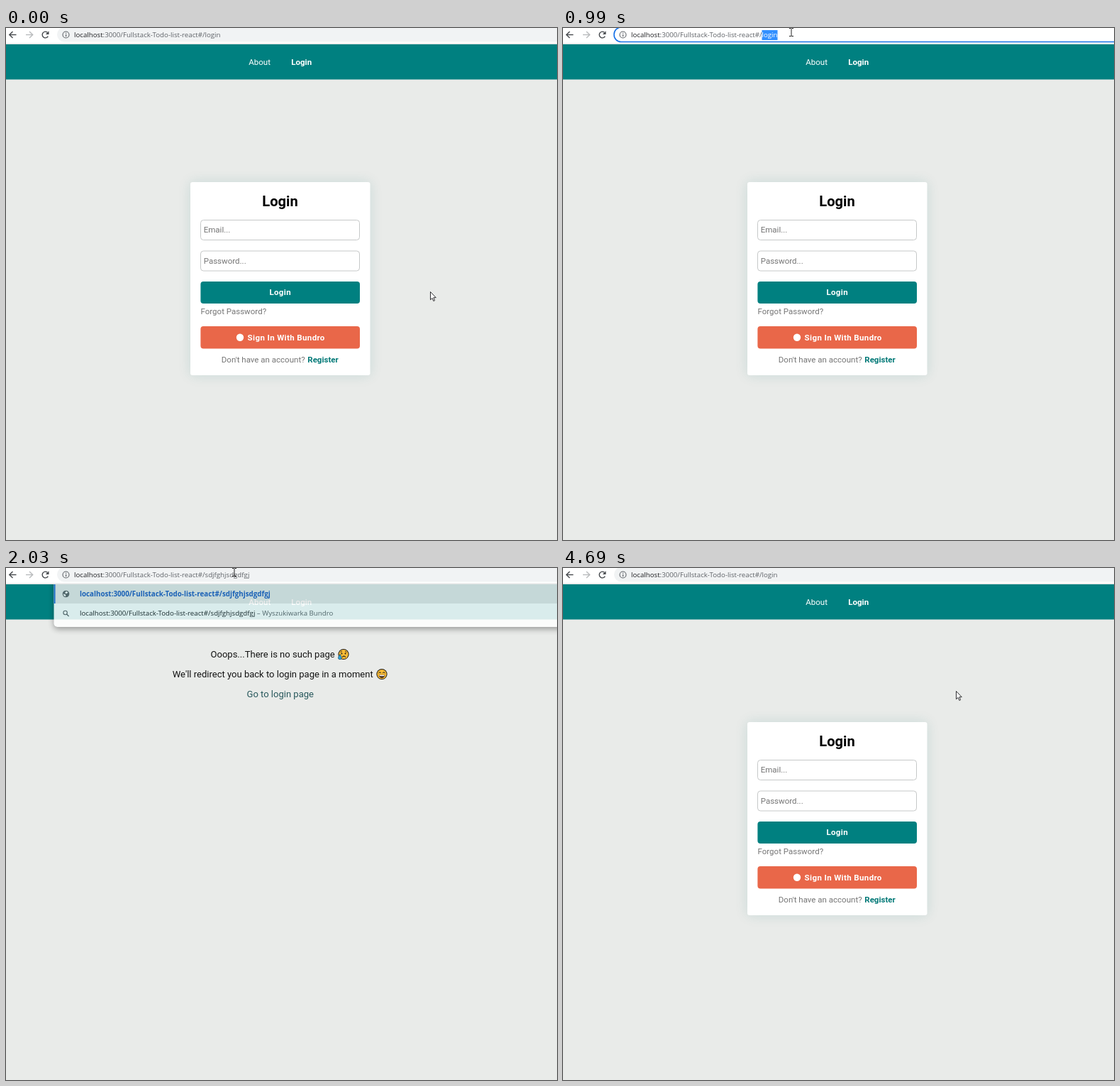
Animation, 777 px wide and 721 px high, one loop 5360 ms. Source, as an HTML page with a canvas:

```html
<!DOCTYPE html>
<html lang="en">
<head>
<meta charset="utf-8">
<title>Todo list login</title>
<style>
  html, body { margin: 0; width: 100%; height: 100%; overflow: hidden; background: #e9ebe9; }
  canvas { display: block; }
</style>
</head>
<body>
<canvas id="stage" width="777" height="721"></canvas>
<script>
const W = 777, H = 721, LOOP = 5360;
const stage = document.getElementById('stage').getContext('2d');
const layer = Object.assign(document.createElement('canvas'), { width: W, height: 110 }).getContext('2d');
let ctx = stage;

const TEAL = '#008080', INK = '#202124', GREY = '#5f6368', MUTED = '#757575';
const PAGE_FONT = 'Roboto, sans-serif', UI_FONT = '"Open Sans", sans-serif';
const UI_SIZE = 9.7, BODY = 11.52;
const HOST = 'localhost', BASE = ':3000/Fullstack-Todo-list-react#/', TYPED = 'sdjfghjsdgdfgj';

// y is the middle of the capitals; returns the x where the text ends
function text(str, x, y, { size = BODY, weight = 400, color = '#000', align = 'left', font = PAGE_FONT, spacing = 0 } = {}) {
  ctx.font = `${weight} ${size}px ${font}`;
  ctx.letterSpacing = spacing + 'px';
  ctx.textAlign = align;
  ctx.fillStyle = color;
  ctx.fillText(str, x, Math.round(y + size * 0.355));
  return x + ctx.measureText(str).width;
}

const uiText = (str, x, y, color, weight = 400, size = UI_SIZE) =>
  text(str, x, y, { size, font: UI_FONT, color, weight });

function rect(x, y, w, h, color) {
  ctx.fillStyle = color;
  ctx.fillRect(x, y, w, h);
}

function round(x, y, w, h, r, fill, stroke) {
  ctx.beginPath();
  ctx.roundRect(x, y, w, h, r);
  if (fill) { ctx.fillStyle = fill; ctx.fill(); }
  if (stroke) { ctx.strokeStyle = stroke; ctx.stroke(); }
}

function disc(x, y, r, color) {
  ctx.beginPath();
  ctx.arc(x, y, r, 0, Math.PI * 2);
  ctx.fillStyle = color;
  ctx.fill();
}

function line(points, color, width) {
  ctx.beginPath();
  points.forEach(([x, y]) => ctx.lineTo(x, y));
  ctx.strokeStyle = color;
  ctx.lineWidth = width;
  ctx.stroke();
}

function arc(x, y, r, from, to, color, width) {
  ctx.beginPath();
  ctx.arc(x, y, r, from, to);
  ctx.strokeStyle = color;
  ctx.lineWidth = width;
  ctx.stroke();
}

function withShadow(color, blur, dy, paint) {
  ctx.save();
  ctx.shadowColor = color;
  ctx.shadowBlur = blur;
  ctx.shadowOffsetY = dy;
  paint();
  ctx.restore();
}

// Paints on a separate layer, so that overlapping parts fade as one
function asLayer(alpha, paint) {
  ctx = layer;
  ctx.clearRect(0, 0, W, H);
  paint();
  ctx = stage;
  ctx.save();
  ctx.globalAlpha = alpha;
  ctx.beginPath();
  ctx.rect(0, 23, W, 90);
  ctx.clip();
  ctx.drawImage(layer.canvas, 0, 0);
  ctx.restore();
}

function navArrow(x, dir, color) {
  line([[x - 5 * dir, 9.5], [x + 4.5 * dir, 9.5]], color, 1.4);
  line([[x, 5], [x + 4.7 * dir, 9.5], [x, 14]], color, 1.4);
}

function reloadIcon() {
  arc(55.5, 9.5, 4.3, 0.5, 5.4, '#46494d', 1.4);
  ctx.beginPath();
  ctx.moveTo(60.5, 4.3);
  ctx.lineTo(60.5, 9);
  ctx.lineTo(55.8, 9);
  ctx.fillStyle = '#46494d';
  ctx.fill();
}

function infoIcon() {
  arc(84.5, 9.5, 4.5, 0, 7, GREY, 1.1);
  rect(84, 9, 1.2, 3.2, GREY);
  rect(84, 6.8, 1.2, 1.2, GREY);
}

function globeIcon(y) {
  disc(84.5, y, 4.8, GREY);
  ctx.fillStyle = '#fff';
  ctx.beginPath();
  ctx.moveTo(85, y - 3.8);
  ctx.lineTo(87.6, y - 2);
  ctx.lineTo(85, y - 0.2);
  ctx.lineTo(83, y - 1.6);
  ctx.fill();
  ctx.beginPath();
  ctx.moveTo(80.8, y - 0.2);
  ctx.lineTo(84.4, y + 1.2);
  ctx.lineTo(83.8, y + 3.8);
  ctx.lineTo(81.6, y + 2.4);
  ctx.fill();
}

function searchIcon(y) {
  arc(83.6, y - 1, 2.7, 0, 7, GREY, 1.1);
  line([[85.5, y + 1], [88.6, y + 4]], GREY, 1.3);
}

function urlText(x, tail) {
  const end = uiText(HOST, x, 9.5, INK);
  return uiText(BASE + tail, end, 9.5, GREY);
}

function toolbar() {
  rect(0, 0, W, 23, '#fff');
  rect(0, 21.5, W, 1.5, '#e3e5e5');
  navArrow(9.5, -1, '#46494d');
  navArrow(33, 1, '#b9bbbd');
  reloadIcon();
}

function addressBar(tail, selection) {
  const focused = selection !== 'none';
  ctx.lineWidth = 1.6;
  round(72, -1, 760, 20.5, 10, focused ? '#fff' : '#f1f3f4', focused ? '#1a73e8' : null);
  infoIcon();
  const end = urlText(96, tail);
  if (!focused) return;
  const from = selection === 'all' ? 96 : end - ctx.measureText(tail).width;
  rect(from, 3, end - from, 14, '#3390ff');
  const str = selection === 'all' ? HOST + BASE + tail : tail;
  uiText(str, from, 9.5, '#fff');
}

function suggestions(tail) {
  const url = HOST + BASE + tail;
  withShadow('rgba(0,0,0,.42)', 8, 3, () => round(67.5, -20, 760, 103, 5, '#fff'));
  rect(67.5, 23, W, 27, '#e8e8e8');
  rect(67.5, 23, 2, 27, '#1a66d0');
  globeIcon(36.5);
  uiText(url, 104, 36.5, '#1f5cc0', 700, 9.8);
  searchIcon(64);
  const end = uiText(url, 104, 64, INK);
  uiText(' – Wyszukiwarka Bundro', end, 64, GREY);
}

function typingBar(tail) {
  withShadow('rgba(0,0,0,.35)', 5, 0, () => rect(67.5, -20, W, 43, '#fff'));
  globeIcon(9.5);
  rect(Math.floor(urlText(104, tail)), 2.5, 1, 13, '#444');
}

function navBar(onLogin) {
  rect(0, 23, W, 49.5, TEAL);
  text('About', 342.3, 47.5, { color: '#fff', weight: onLogin ? 400 : 500 });
  text('Login', 416.7, 47.5, { color: '#fff', weight: onLogin ? 700 : 500, align: 'center' });
}

function field(y, label) {
  ctx.lineWidth = 1;
  round(274.5, y + 0.5, 224, 28, 4, '#fff', '#c6c8c8');
  text(label, 278.7, y + 14.3, { color: MUTED });
}

function loginCard() {
  const bold = { weight: 700, color: '#fff', spacing: 0.36 };
  withShadow('rgba(0,110,110,.14)', 18, 0, () => round(260, 217, 253.5, 272, 3, '#fff'));
  text('Login', 386.5, 243.5, { size: 20.16, weight: 700, align: 'center' });
  field(270, 'Email...');
  field(313.5, 'Password...');
  round(274.4, 357, 224.6, 31, 4, TEAL);
  text('Login', 386.7, 371.7, { ...bold, align: 'center' });
  text('Forgot Password?', 274.5, 398.5, { color: MUTED });
  round(274.4, 420, 224.6, 31.5, 4, '#e96749');
  disc(330, 435.7, 5.2, '#fff');
  text('Sign In With Bundro', 340.6, 435.5, bold);
  text("Don't have an account?", 303.8, 466.5, { color: MUTED });
  text('Register', 425.3, 466.5, { color: '#057a78', weight: 700 });
}

function face(x, y) {
  disc(x, y, 7.6, '#1c1a16');
  disc(x, y, 6.6, '#fcbd35');
}

function sadFace(x, y) {
  face(x, y);
  disc(x - 2.6, y - 1, 1.1, '#222');
  disc(x + 2.6, y - 1, 1.1, '#222');
  arc(x + 0.6, y + 5, 2.3, Math.PI * 1.1, Math.PI * 1.9, '#222', 1.1);
  line([[x - 4.5, y - 3], [x - 2, y - 4]], '#222', 0.9);
  line([[x + 4.5, y - 3], [x + 2, y - 4]], '#222', 0.9);
  ctx.beginPath();
  ctx.moveTo(x - 5, y);
  ctx.quadraticCurveTo(x - 10, y + 7, x - 5, y + 7.2);
  ctx.quadraticCurveTo(x - 0.6, y + 7, x - 5, y);
  ctx.fillStyle = '#2ea8e0';
  ctx.fill();
  ctx.strokeStyle = '#173f55';
  ctx.lineWidth = 0.7;
  ctx.stroke();
}

function happyFace(x, y) {
  face(x, y);
  arc(x - 2.8, y - 1.2, 1.5, Math.PI, Math.PI * 2, '#222', 1);
  arc(x + 2.8, y - 1.2, 1.5, Math.PI, Math.PI * 2, '#222', 1);
  ctx.beginPath();
  ctx.arc(x, y + 1, 4.4, 0, Math.PI);
  ctx.closePath();
  ctx.fillStyle = '#3b2418';
  ctx.fill();
  rect(x - 3.6, y + 1.2, 7.2, 1.5, '#fff');
}

function missingPage() {
  const opts = { size: 13.04, color: '#141414' };
  text('Ooops...There is no such page', 288.5, 121.3, opts);
  sadFace(476, 121.5);
  text("We'll redirect you back to login page in a moment", 234.7, 149.3, opts);
  happyFace(530, 149.5);
  text('Go to login page', 339.5, 177.3, { ...opts, color: '#28585c' });
}

function arrowPointer(x, y) {
  const shape = [[0, 0], [0, 11.2], [2.6, 8.9], [4.4, 13], [6.1, 12.2], [4.4, 8.2], [7.8, 8.2]];
  ctx.beginPath();
  shape.forEach(([dx, dy]) => ctx.lineTo(x + 0.5 + dx, y + 0.5 + dy));
  ctx.closePath();
  ctx.fillStyle = '#fff';
  ctx.fill();
  ctx.strokeStyle = '#1b1b1f';
  ctx.lineWidth = 0.9;
  ctx.stroke();
}

function beamPointer(x, y) {
  x = Math.round(x);
  y = Math.round(y);
  rect(x - 0.5, y - 5, 1, 11, '#222');
  for (const end of [y - 6, y + 5]) {
    rect(x - 3, end, 2.5, 1, '#222');
    rect(x + 0.5, end, 2.5, 1, '#222');
  }
}

const SPOTS = { start: [598, 371], bar: [322, 6], rest: [554, 173] };

// Sine-eased straight move, sampled every 40 ms
function glide(from, to, t, begin, length) {
  const elapsed = Math.min(length, Math.max(0, Math.floor((t - begin) / 40) * 40));
  const p = (1 - Math.cos(Math.PI * elapsed / length)) / 2;
  return from.map((v, i) => v + (to[i] - v) * p);
}

function pointer(t) {
  const [x, y] = t < 2490
    ? glide(SPOTS.start, SPOTS.bar, t, 0, 800)
    : glide(SPOTS.bar, SPOTS.rest, t, 2490, 480);
  (y < 21 ? beamPointer : arrowPointer)(x, y);
}

function draw(t) {
  const missing = t >= 2030 && t < 4690;
  const typing = t >= 1410 && t < 2030;
  const count = Math.min(14, 2 + Math.floor(Math.floor((t - 1410) / 55) * 1.5));
  const typed = TYPED.slice(0, count);

  rect(0, 0, W, H, '#e9ebe9');
  navBar(!missing);
  if (missing) missingPage(); else loginCard();
  toolbar();

  if (typing) {
    asLayer(t < 1465 ? 0.88 : 1, () => suggestions(typed));
    typingBar(typed);
    asLayer(t < 1465 ? 0.88 : 1, () => suggestions(typed));
  } else {
    const selection = t >= 990 && t < 1410 ? 'word' : t >= 870 && t < 990 ? 'all' : 'none';
    addressBar(missing ? TYPED : 'login', selection);
    if (t >= 2030 && t < 2070) asLayer(0.85, () => suggestions(TYPED));
  }
  pointer(t);
}

// One overlay pass per state keeps the fade exact
function drawTyping(t, typed) {
  typingBar(typed);
  asLayer(t < 1465 ? 0.88 : 1, () => suggestions(typed));
}

const begin = performance.now();
function tick() {
  draw((performance.now() - begin) % LOOP);
  requestAnimationFrame(tick);
}
tick();
</script>
</body>
</html>
```
